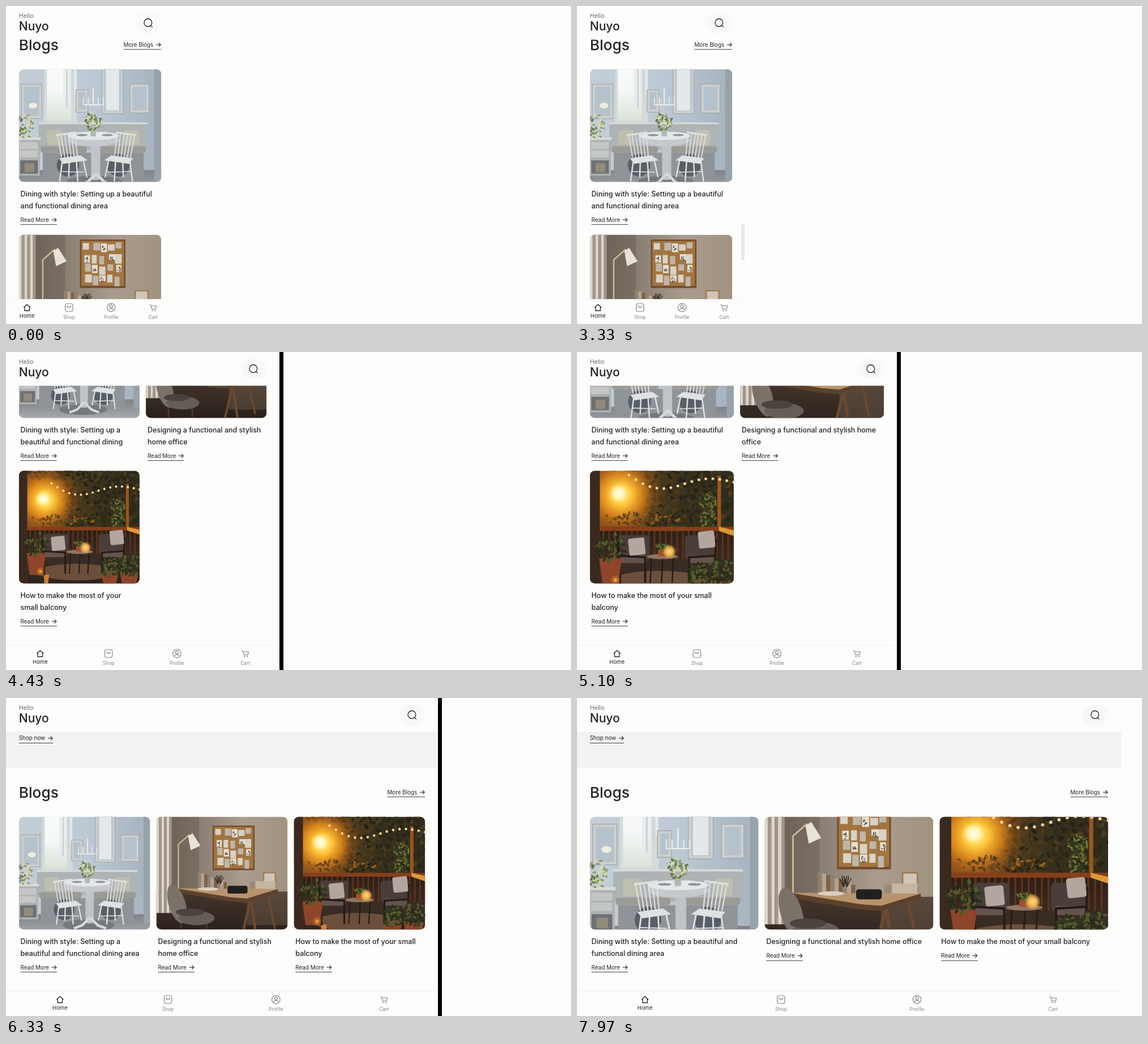
An HTML page with a canvas for the animation above (8000 ms loop, 998x561 px).

```html
<!DOCTYPE html>
<html lang="en">
<head>
<meta charset="utf-8">
<title>Responsive blog page</title>
<style>
html, body { margin: 0; width: 100%; height: 100%; overflow: hidden; background: #fdfdfc; }
canvas { display: block; width: 998px; height: 561px; }
</style>
</head>
<body>
<canvas id="stage" width="998" height="561"></canvas>
<script>
const ctx = document.getElementById('stage').getContext('2d');
const LOOP = 8000, PAD = 22.8, GAP = 11.2, PHOTO_H = 198.5, ROW = 292;
const INK = '#222226', GRAY = '#85858a', PAGE = '#fdfdfc';
const FACE = 'Inter, "Liberation Sans", sans-serif';
const TITLE_FONT = `500 12.45px ${FACE}`;

// the window edge is dragged from 3330 ms on: [time, width]
const DRAG = [[3330, 297], [3830, 349], [4430, 483], [4970, 543], [5770, 677], [6870, 845], [7470, 945], [7970, 961]];

const ramp = (t, a, b) => Math.min(1, Math.max(0, (t - a) / (b - a)));

function panelWidth(t) {
  let w = DRAG[0][1];
  for (let i = 1; i < DRAG.length; i++)
    w += (DRAG[i][1] - DRAG[i - 1][1]) * ramp(t, DRAG[i - 1][0], DRAG[i][0]);
  return Math.round(w);
}

function seeded(s) {
  return () => (s = (s * 16807) % 2147483647) / 2147483647;
}

// drawing helpers
function box(x, y, w, h, fill, r = 0) {
  ctx.fillStyle = fill;
  ctx.beginPath();
  ctx.roundRect(x, y, w, h, r);
  ctx.fill();
}
function oval(x, y, rx, ry, fill, rot = 0) {
  ctx.fillStyle = fill;
  ctx.beginPath();
  ctx.ellipse(x, y, rx, ry, rot, 0, 7);
  ctx.fill();
}
function trace(p) {
  ctx.beginPath();
  for (let i = 0; i < p.length; i += 2) ctx.lineTo(p[i], p[i + 1]);
}
function poly(fill, ...p) {
  trace(p);
  ctx.fillStyle = fill;
  ctx.fill();
}
function line(color, width, ...p) {
  trace(p);
  ctx.strokeStyle = color;
  ctx.lineWidth = width;
  ctx.stroke();
}
function stops(g, colors) {
  colors.forEach((c, i) => g.addColorStop(i / (colors.length - 1), c));
  return g;
}
const across = (...colors) => stops(ctx.createLinearGradient(0, 0, 203, 0), colors);
const down = (y, h, ...colors) => stops(ctx.createLinearGradient(0, y, 0, y + h), colors);
function glow(x, y, r, ...colors) {
  oval(x, y, r, r, stops(ctx.createRadialGradient(x, y, 0, x, y, r), colors));
}
function leaves(x, y, rx, ry, n, colors, size = 2.4) {
  const rnd = seeded(Math.round(x * 97 + y));
  for (let i = 0; i < n; i++) {
    const a = rnd() * 6.28, d = Math.sqrt(rnd());
    oval(x + Math.cos(a) * d * rx, y + Math.sin(a) * d * ry, size, size * 0.5,
      colors[i % colors.length], rnd() * 3.1);
  }
}
// draws a part and its mirror image about the axis x
function mirrored(x, part) {
  for (const dir of [1, -1]) {
    ctx.save();
    ctx.translate(x, 0);
    ctx.scale(dir, 1);
    part(dir);
    ctx.restore();
  }
}
function text(s, x, y, font, color = INK, align = 'left') {
  ctx.font = `${font} ${FACE}`;
  ctx.fillStyle = color;
  ctx.textAlign = align;
  ctx.fillText(s, x, y);
}

// photos, drawn in a square of 203 units
function wallFrame(x, y, w, h) {
  box(x, y, w, h, '#a3a8aa');
  box(x + 1, y + 1, w - 2, h - 2, '#ced0ce');
  box(x + 4, y + 4, w - 8, h - 8, '#b6c2cb');
}
function diningRoom() {
  const green = ['#66794c', '#8c9c68', '#d4d7a8'];
  box(0, 0, 203, 203, across('#c3ced7', '#bdcad6', '#a5b2bd'));
  box(0, 165, 203, 38, down(165, 38, '#7f8387', '#adb1b5'));
  box(193, 0, 10, 180, '#97a2ab');
  box(36, 4, 47, 94, '#d5dadb');
  box(40, 8, 34, 86, down(8, 86, '#fafbfb', '#f5f8f6', '#dbe3d8'));
  for (let i = 0; i < 5; i++) box(63 + i * 4, 0, 3, 82 - i * 6, i % 2 ? '#cfd6da' : '#e8ebec');
  wallFrame(3, 42, 30, 50);
  wallFrame(81, 50, 18, 33);
  wallFrame(118, 9, 31, 76);
  box(124, 13, 19, 67, '#e3e8ea');
  wallFrame(158, 42, 28, 42);
  oval(20, 73, 6, 4, '#f0ede0');
  for (let i = -2; i <= 2; i++) {
    line('#ecedeb', 1.3, 106, 48, 106, 72, 106 + i * 7, 72, 106 + i * 7, 61);
  }
  // benches
  mirrored(106, () => {
    box(-78, 98, 78, 38, '#aeb3b5');
    box(-78, 97, 78, 2.5, '#d9dbda');
    box(-72, 140, 72, 36, '#8f9498');
    box(-75, 131, 66, 9, '#9b9b95', 3);
    oval(-36, 158, 16, 16, '#585f66');
    box(-66, 108, 23, 21, '#bfbfb0', 4);
  });
  // dresser
  box(0, 118, 30, 55, '#aeb1b2');
  box(0, 118, 31, 4, '#dadad7');
  for (let i = 0; i < 2; i++) box(1, 125 + i * 12, 26, 10, '#c4c6c6');
  box(2, 151, 25, 19, '#6e7173');
  box(8, 155, 14, 13, '#928b7c', 2);
  leaves(9, 103, 12, 17, 45, green);
  // table
  oval(108, 182, 40, 9, '#74797e');
  box(103, 125, 13, 54, '#c0c4c7', 4);
  mirrored(110, () => line('#d5d7d8', 4, 0, 170, -12, 182, -25, 187));
  oval(106, 122, 37, 9, '#c5c9cd');
  oval(106, 116, 37, 6, '#e4e7ea');
  mirrored(108, () => oval(-18, 115, 8, 1.6, '#8d959d'));
  box(102, 105, 8, 12, '#aebbb2', 2);
  leaves(105, 96, 13, 12, 60, green);
  // chairs
  mirrored(110, () => {
    const c = '#dfe1e2';
    for (let i = 0; i < 6; i++) line(c, 1.5, -55 + i * 5, 115 - i * 0.6, -49 + i * 4.5, 147);
    line(c, 2.4, -57, 115, -28, 111);
    for (let i = 0; i < 4; i++) line(c, 2, -48 + i * 10, 151, -52 + i * 13, 181 - i % 2 * 6);
    line(c, 1.3, -50, 167, -17, 168);
    poly(c, -53, 148, -22, 144, -12, 151, -47, 156);
  });
}

function office() {
  const wood = '#6b4930', rnd = seeded(914);
  box(0, 0, 203, 203, across('#73675e', '#8b7f74', '#a99c8e', '#a0937f'));
  box(0, 0, 66, 203, 'rgba(70,57,48,.22)');
  box(0, 130, 203, 73, down(130, 73, '#44362d', '#261d19'));
  box(140, 130, 63, 52, 'rgba(130,108,88,.35)');
  for (let i = 0; i < 6; i++) box(i * 4, 0, 4, 163, ['#ded6cb', '#a09588'][i % 2]);
  // pin board
  box(87, 28, 65, 69, '#714d2d');
  box(89, 30, 61, 64, '#a27540');
  for (let i = 0; i < 20; i++) {
    const x = 91 + i % 5 * 11.3 + rnd() * 4, y = 32 + Math.floor(i / 5) * 15 + rnd() * 5;
    box(x, y, 7 + rnd() * 3, 8 + rnd() * 6, ['#d8d2c7', '#bfb6aa', '#e4ded3'][i % 3]);
    if (i % 3 === 2) leaves(x + 4, y + 6, 2, 4, 7, ['#4c4b4a'], 1.2);
  }
  // lamp
  line('#cbb898', 2, 34, 130, 34, 57, 51, 42);
  poly('#e9e2d8', 49, 44, 56, 40, 68, 59, 53, 66);
  // things on the desk
  for (let i = 0; i < 9; i++) box(64 + i * 5, 96 + i * 2 + rnd() * 7, 5, 29 - i * 2, ['#92806f', '#b4a38f', '#7e6249'][i % 3]);
  box(165, 100, 20, 25, '#a17c56');
  box(167, 102, 16, 21, '#cfc6b9');
  box(153, 114, 31, 13, '#c4b6a0');
  mirrored(122, dir => {
    const x = dir * -25 + 2;
    for (let i = 0; i < 4; i++) line('#3b322c', 1.2, x, 118, x - 4 + i * 3, 105 + i % 2 * 3);
  });
  box(144, 115, 9, 12, '#9d8a76');
  // desk
  for (const dx of [-14, 9]) line(wood, 4, 146, 142, 146 + dx, 200);
  line(wood, 3, 172, 132, 184, 190);
  poly('#b8946c', 30, 125, 188, 126, 140, 141, 115, 139);
  poly('#5d412c', 30, 125, 115, 139, 140, 141, 188, 126, 188, 131, 140, 147, 112, 145, 30, 131);
  oval(80, 126, 16, 2.6, '#d9d0c2');
  box(110, 121, 31, 12, '#22201f', 3);
  // chair
  for (const x of [38, 78]) line('#4d3828', 2.5, x, 175, x, 203);
  oval(32, 149, 13, 31, '#7a7169', -0.3);
  oval(62, 171, 28, 11, '#665d56');
  oval(52, 162, 22, 6, '#4b433e');
}

function pot(x, y, w, h, bush) {
  poly('#8e4529', x, y, x + w, y, x + w * 0.85, y + h, x + w * 0.15, y + h);
  leaves(x + w / 2, y - bush * 0.7, bush, bush, 80, ['#333b1f', '#565a2a', '#252d1a'], 3);
}
function balcony() {
  const dark = '#251c18', trees = ['#2c2a1a', '#4b3c1e', '#39331d', '#242416'];
  box(0, 0, 203, 203, across('#84511a', '#5e421a', '#37301c', '#302b1c'));
  leaves(125, 50, 95, 60, 420, trees, 4);
  leaves(70, 8, 70, 14, 110, trees, 4);
  glow(44, 56, 60, '#fff3a0', '#ffc539', '#f0941dcc', '#c8681a66', '#a7541800');
  glow(41, 54, 15, '#fffef0', '#fff3b0', '#ffd95a00');
  leaves(70, 90, 58, 9, 70, ['#6b481c', '#9a601c', '#4a3a1c'], 2.5);
  box(0, 0, 14, 203, '#39291f');
  box(180, 29, 5, 77, '#9a571c');
  for (let i = 0; i < 16; i++) {
    const u = i / 15;
    glow(55 + u * 148, 28 + 46 * u - 36 * u * u + 9 * Math.sin(u * 6.3), 2.6, '#ffeec0', '#f4d49a', '#ffcd6f00');
  }
  for (const y of [66, 90]) leaves(166, y, 12, 13, 45, ['#4d5428', '#747a36', '#2f3a20']);
  // railing and floor
  box(14, 106, 189, 97, down(106, 97, '#2b1f18', '#3a2d25', '#2b221d'));
  for (let x = 18; x < 203; x += 8) box(x, 107, 2.4, 40, '#613319');
  box(14, 101, 189, 6, '#863f1a');
  poly('#e09836', 182, 101, 203, 106, 203, 114, 182, 107);
  oval(97, 177, 66, 14, '#6c4f3b');
  poly('#cd8036', 42, 181, 51, 181, 48, 203, 43, 203);
  // armchairs, table, plants
  mirrored(108, dir => {
    const x = dir > 0 ? -68 : -70;
    box(x, 113, 44, 34, '#4b3d39', 5);
    box(x + 2, 141, 38, 11, '#65534d', 3);
    line(dark, 3, x, 118, x + 3, 182);
    line(dark, 3, x + 2, 142, x + 38, 144, x + 38, 180);
    ctx.rotate(-0.1 * dir);
    box(x + (dir > 0 ? 2 : 14), 112, 23, 24, '#b3a69f', 3);
  });
  for (const x of [87, 103, 118]) line(dark, 2, x, 143, x - 2, 180);
  oval(102, 143, 22, 3.5, '#8f7662');
  box(96, 133, 12, 9, '#a44e2a', 1);
  leaves(102, 130, 9, 5, 24, ['#65712d', '#3e4f25']);
  glow(112, 136, 10, '#ffdf8a', '#f5b04b', '#ffc85b00');
  pot(13, 145, 32, 37, 21);
  pot(139, 180, 28, 22, 16);
  pot(170, 178, 31, 23, 19);
  glow(36, 176, 8, '#ffc454', '#e07f1e77', '#e07f1e00');
}

const CARDS = [
  ['Dining with style: Setting up a beautiful and functional dining area', diningRoom],
  ['Designing a functional and stylish home office', office],
  ['How to make the most of your small balcony', balcony]
];

// page parts
function link(s, x, y, right = false) {
  ctx.font = `9.84px ${FACE}`;
  const w = ctx.measureText(s).width;
  if (right) x -= w + 14;
  text(s, x, y, '9.84px');
  const tip = x + w + 13, m = y - 3.4;
  line(INK, 1.1, tip - 8, m, tip, m);
  line(INK, 1.1, tip - 3.4, m - 3.4, tip, m, tip - 3.4, m + 3.4);
  box(x, Math.round(y + 4.5), w + 14, 1, '#45454a');
}
function wrap(s, width) {
  ctx.font = TITLE_FONT;
  const rows = [''];
  for (const word of s.split(' ')) {
    const last = rows.length - 1, next = (rows[last] + ' ' + word).trim();
    if (ctx.measureText(next).width <= width) rows[last] = next;
    else rows.push(word);
  }
  return rows.slice(0, 2);
}
function card([title, paint], x, y, w, hover) {
  ctx.globalAlpha = hover;
  box(x, y + 150, w, 130, '#f3f3f4', 8);
  ctx.globalAlpha = 1;

  ctx.save();
  ctx.beginPath();
  ctx.roundRect(x, y, w, PHOTO_H, 8.4);
  ctx.clip();
  const side = Math.max(w, PHOTO_H);
  ctx.translate(x + (w - side) / 2, y + (PHOTO_H - side) / 2);
  ctx.scale(side / 203, side / 203);
  paint();
  ctx.restore();

  const rows = wrap(title, w - 7);
  rows.forEach((s, i) => text(s, x + 2.8, y + 224.6 + i * 20.6, '500 12.45px'));
  link('Read More', x + 2.8, y + 248.3 + (rows.length - 1) * 20.6);
}

function ring(x, y, r, from = 0, to = 7) {
  ctx.beginPath();
  ctx.arc(x, y, r, from, to);
  ctx.stroke();
}
const ICONS = {
  Home(c) {
    line(c, 1.3, -6, 0, 0, -5.5, 6, 0);
    line(c, 1.3, -4.2, -1, -4.2, 5.5, 4.2, 5.5, 4.2, -1);
  },
  Shop() {
    ctx.beginPath();
    ctx.roundRect(-6.7, -7, 13.4, 14, 3.5);
    ctx.stroke();
    ring(0, -3.5, 3.2, 0, Math.PI);
  },
  Profile() {
    ring(0, 0, 7.3);
    ring(0, -2, 2.6);
    ring(0, 6.5, 5, 3.5, 5.9);
  },
  Cart(c) {
    line(c, 1.1, -6.5, -5, -4.3, -5, -2.5, 2.5, 4.5, 2.5, 6, -3, -3.8, -3);
    for (const x of [-1.5, 3.7]) oval(x, 5.2, 1.1, 1.1, c);
  }
};

function nav(w) {
  box(0, 517, w, 44, PAGE);
  box(0, 517, w, 1, '#f2f2f3');
  Object.keys(ICONS).forEach((name, i) => {
    const x = w * (2 * i + 1) / 8, color = i ? GRAY : INK;
    ctx.save();
    ctx.translate(x, 532);
    ctx.strokeStyle = color;
    ctx.lineWidth = 1.2;
    ICONS[name](color);
    ctx.restore();
    text(name, x, i ? 551.6 : 550.4, i ? '8.44px' : '9.5px', color, 'center');
  });
}
function header(w) {
  box(0, 0, w, 59.5, PAGE);
  text('Hello', PAD, 20.5, '10.7px', '#6c6c70');
  text('Nuyo', PAD, 42.8, '500 21px');
  box(w - 68, 12, 45, 36, '#f8f8f8', 18);
  ctx.strokeStyle = INK;
  ctx.lineWidth = 1.3;
  ring(w - 46.2, 29.4, 6.9);
  line(INK, 1.3, w - 41.2, 34.4, w - 38.3, 37.3);
}

function draw(t) {
  const w = panelWidth(t), cols = w < 450 ? 1 : w < 610 ? 2 : 3;
  const top = [112, 210 - ROW, 210][cols - 1] - 0.3;
  const cw = (w - 2 * PAD - GAP * (cols - 1)) / cols;
  const hover = ramp(t, 1730, 1930) * (1 - ramp(t, 2300, 2500));

  box(0, 0, 998, 561, PAGE);
  box(0, top - 400, w, 314, '#f1f2f2');
  link('Shop now', PAD, top - 135.3);
  text('Blogs', PAD, top - 34.2, '500 26.2px');
  link('More Blogs', w - PAD, top - 40, true);
  CARDS.forEach((c, i) => card(c, PAD + (i % cols) * (cw + GAP),
    top + Math.floor(i / cols) * ROW, cw, i ? 0 : hover));
  header(w);
  nav(w);

  // scroll thumb
  ctx.globalAlpha = ramp(t, 1730, 1930) * (1 - ramp(t, 4100, 4250));
  box(w - 7, 384 + 5 * ramp(t, 3330, 3830), 6, 65, t < 2630 ? '#efeff0' : '#e9e9ea', 3);
  ctx.globalAlpha = 1;
  // strip not yet repainted while the edge is dragged
  if (t > 3340 && t < 6650) box(w, 0, 7, 561, '#000');
}

const start = performance.now();
function tick() {
  draw((performance.now() - start) % LOOP);
  requestAnimationFrame(tick);
}
tick();
</script>
</body>
</html>
```
